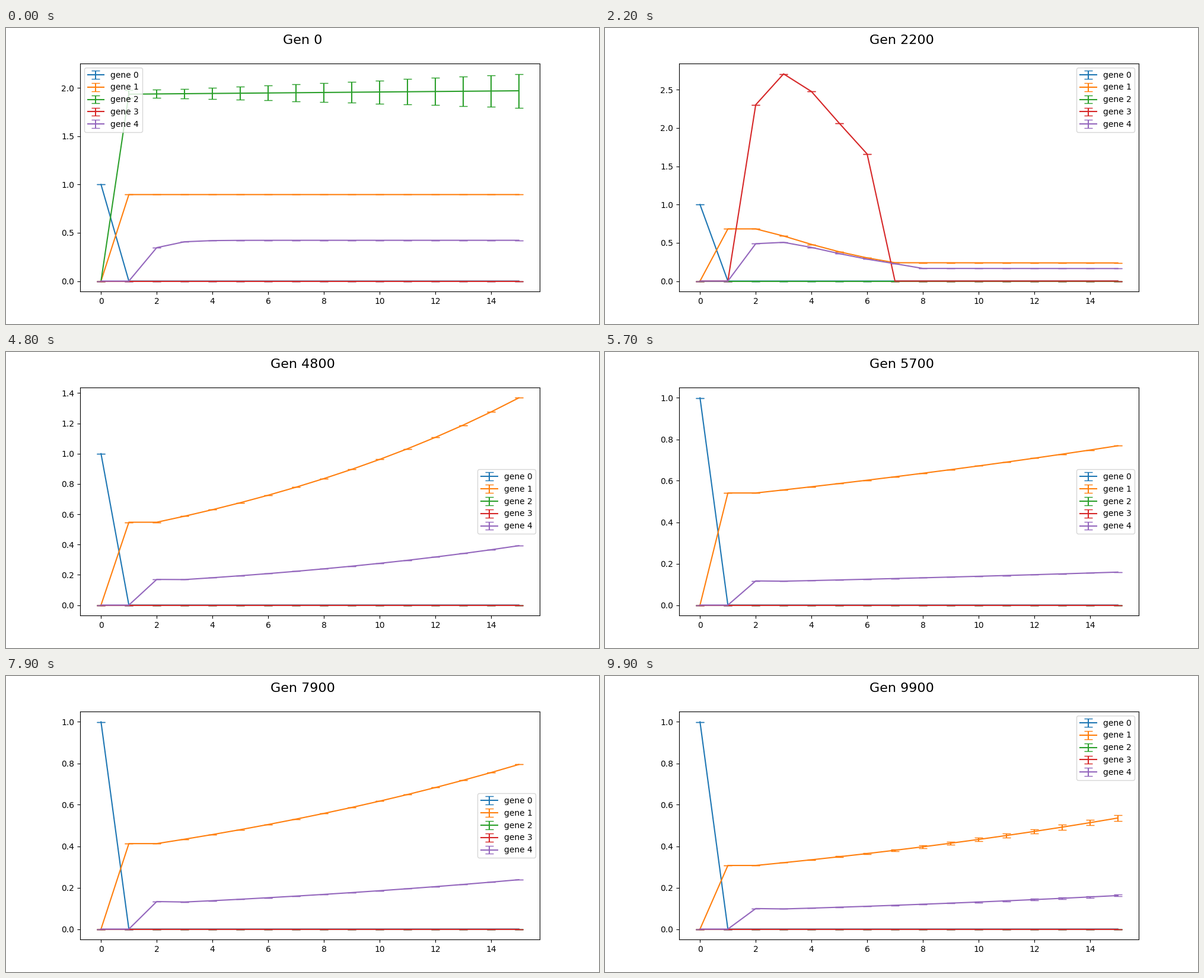
A matplotlib script that plays this animation: 1000x500 px, repeating every 10 s.

```python
import numpy as np
import matplotlib.pyplot as plt
from matplotlib.animation import FuncAnimation

FRAMES, INTERVAL, GENS = 100, 100, 100
STEPS = np.arange(16)

# Turning points of the evolution
TIMES = [0, 13, 22, 38, 57, 79, 99]
LEVEL = [.8955, .571, .682, .554, .541, .4125, .307]
GROWTH = [1, .9985, .9985, .998, 1.0274, 1.0517, 1.0438]
RATIO = [.4715, .598, .69, .413, .2126, .3155, .3152]


def drift(t, values):
    return np.interp(t, TIMES, values)


def bump(t, lo, hi):
    """Rises from 0 to 1 and back between lo and hi."""
    return np.sin(np.pi * (np.clip(t, lo, hi) - lo) / (hi - lo)) ** 2


def gene1(t, pulse):
    growth = drift(t, GROWTH) + .06 * bump(t, 38, 57) - .012 * bump(t, 57, 79)
    y = np.zeros(16)
    y[1:3] = drift(t, LEVEL)
    for k in range(3, 16):
        rate = growth
        if pulse > 0 and k <= 7:
            rate = 1 - pulse * .21 * (1 - .35 * .33 ** (k - 3))
        y[k] = y[k - 1] * rate
    early = .013 * bump(t, 4, 22)
    late = .0012 * np.interp(t, [90, 99], [0, 1])
    sd = np.hypot(early, late * np.maximum(STEPS - 3, 0))
    return y, sd * (STEPS > 0)


def gene2(t):
    share = np.interp(t, [4, 7], [1, 0])
    y = 1.935 * share * (1 + .0013 * (STEPS - 1))
    sweep = .97 * np.sqrt(share * (1 - share))
    sd = np.hypot(share * np.hypot(.037, .0114 * STEPS), sweep)
    return y * (STEPS > 0), sd * (STEPS > 0)


def gene3(driver, pulse):
    y = np.zeros(16)
    k = np.arange(2, 7)
    y[k] = pulse * 4.365 * driver[k - 1] * (1 - .226 * .4 ** (k - 2))
    return y


def gene4(t, driver, pulse):
    y = np.zeros(16)
    k = np.arange(2, 16)
    lag = .205 * np.exp(-t / 20) - .025
    boost = 1 + .085 * pulse * (k <= 7)
    y[k] = drift(t, RATIO) * boost * driver[k - 1] * (1 - lag * .2 ** (k - 2))
    return y


def genes(t):
    """Mean and spread of each gene over the 16 steps."""
    pulse = np.interp(t, [18, 20, 27, 29], [0, 1, 1, 0])
    zero = np.zeros(16)
    y1, sd = gene1(t, pulse)
    return [
        (1.0 * (STEPS == 0), zero),
        (y1, sd),
        gene2(t),
        (gene3(y1, pulse), zero),
        (gene4(t, y1, pulse), drift(t, RATIO) * sd * (STEPS > 1)),
    ]


fig, ax = plt.subplots(figsize=(10, 5), dpi=100)
fig.subplots_adjust(left=.125, right=.9, bottom=.11, top=.88)
title = fig.suptitle("Gen 0", fontsize=16, y=.978)


def draw(i):
    ax.clear()
    for n, (mean, sd) in enumerate(genes(i)):
        ax.errorbar(STEPS, mean, yerr=sd, capsize=5, label=f"gene {n}")
    ax.legend(loc="best")
    title.set_text(f"Gen {i * GENS}")
    return []


anim = FuncAnimation(fig, draw, frames=FRAMES, interval=INTERVAL,
                     repeat=True, repeat_delay=0)
plt.show()
```
